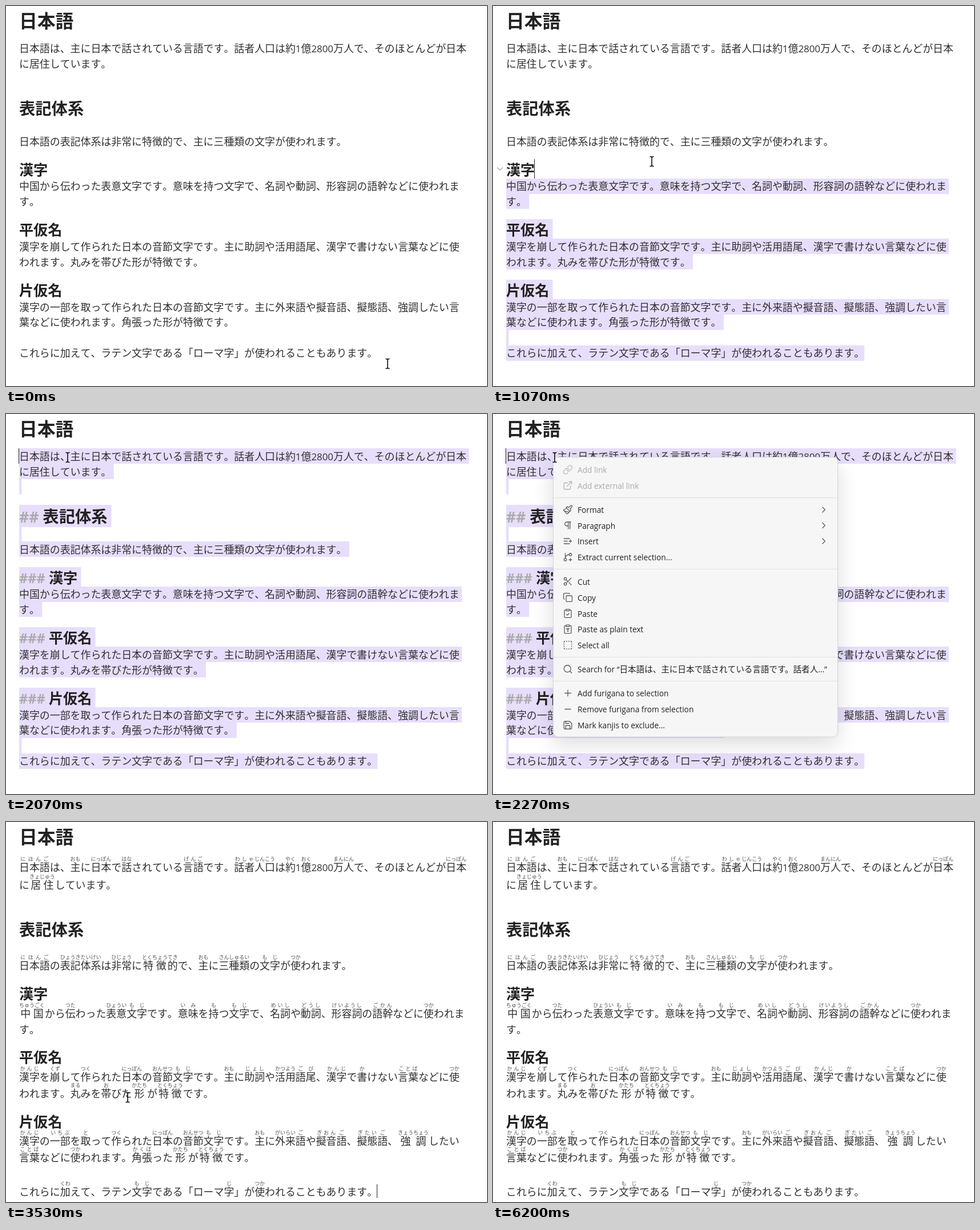
These frames come from a looping animation (842 by 665 pixels, 6800 ms). An HTML page with a canvas:

```html
<!DOCTYPE html>
<html lang="ja">
<head>
<meta charset="utf-8">
<title>日本語</title>
<style>
html, body { margin: 0; width: 100%; height: 100%; overflow: hidden; background: #fff; }
canvas { display: block; }
</style>
</head>
<body>
<canvas id="stage" width="842" height="665"></canvas>
<script>
const ctx = document.getElementById('stage').getContext('2d');
const JP = '"Noto Sans CJK JP", "Noto Sans CJK", sans-serif';
const LATIN = '"Open Sans", "Noto Sans", sans-serif';
const LEFT = 23, RIGHT = 810, BODY = 17.92, H1 = 31.8, H2 = 28.3, H3 = 25.1;
const INK = '#222', BODY_INK = '#303030', RUBY_INK = '#505050', FAINT = '#ababab', SELECTION = '#e7defc';
const TICK = 1000 / 15, TICKS = 102;
const MENU_OPEN = 34, RUBY_ON = 53;

// Each block: size, text with {readings}, line centres without and with readings.
const doc = [
  [H1, '日本語', [26], [26]],
  [BODY, '日本語{にほんご}は、主{おも}に日本{にっぽん}で話{はな}されている言語{げんご}です。話者{わしゃ}人口{じんこう}は約{やく}1億{おく}2800万人{まんにん}で、そのほとんどが日本{にっぽん}に居住{きょじゅう}しています。', [74, 101], [79.5, 110]],
  [BODY, '', [127.5], [0]],
  [H2, '表記体系', [179], [188]],
  [BODY, '', [210.5], [0]],
  [BODY, '日本語{にほんご}の表記体系{ひょうきたいけい}は非常{ひじょう}に特徴{とくちょう}的{てき}で、主{おも}に三種類{さんしゅるい}の文字{もじ}が使{つか}われます。', [237], [251]],
  [H3, '漢字', [286], [300]],
  [BODY, '中国{ちゅうごく}から伝{つた}わった表意{ひょうい}文字{もじ}です。意味{いみ}を持{も}つ文字{もじ}で、名詞{めいし}や動詞{どうし}、形容詞{けいようし}の語幹{ごかん}などに使{つか}われます。', [315.5, 342], [335.5, 363]],
  [H3, '平仮名', [391.5], [411]],
  [BODY, '漢字{かんじ}を崩{くず}して作{つく}られた日本{にっぽん}の音節{おんせつ}文字{もじ}です。主{おも}に助詞{じょし}や活用{かつよう}語尾{ごび}、漢字{かんじ}で書{か}けない言葉{ことば}などに使{つか}われます。丸{まる}みを帯{お}びた形{かたち}が特徴{とくちょう}です。', [421, 448], [446.5, 475]],
  [H3, '片仮名', [497], [524]],
  [BODY, '漢字{かんじ}の一部{いちぶ}を取{と}って作{つく}られた日本{にっぽん}の音節{おんせつ}文字{もじ}です。主{おも}に外来{がいらい}語{ご}や擬音{ぎおん}語{ご}、擬態{ぎたい}語{ご}、強調{きょうちょう}したい言葉{ことば}などに使{つか}われます。角張{かくば}った形{かたち}が特徴{とくちょう}です。', [527, 553.5], [558.5, 587.5]],
  [BODY, '', [580.5], [0]],
  [BODY, 'これらに加{くわ}えて、ラテン文字{もじ}である「ローマ字{じ}」が使{つか}われることもあります。', [607.5], [647]]
];

const clip = 'M9 2h6a1 1 0 0 1 1 1v2a1 1 0 0 1-1 1H9a1 1 0 0 1-1-1V3a1 1 0 0 1 1-1zM16 4h2a2 2 0 0 1 2 2v14a2 2 0 0 1-2 2H6a2 2 0 0 1-2-2V6a2 2 0 0 1 2-2h2';
const ring = (x, y, r) => `M${x} ${y - r}a${r} ${r} 0 1 0 .01 0z`;
// Menu items: centre, label, icon, kind.
const items = [
  [98, 'Add link', 'M10 13a5 5 0 0 0 7.54.54l3-3a5 5 0 0 0-7.07-7.07l-1.72 1.71M14 11a5 5 0 0 0-7.54-.54l-3 3a5 5 0 0 0 7.07 7.07l1.71-1.71', 'off'],
  [125.5, 'Add external link', 'M15 3h6v6M10 14 21 3M18 13v6a2 2 0 0 1-2 2H5a2 2 0 0 1-2-2V8a2 2 0 0 1 2-2h6', 'off'],
  [168, 'Format', 'M14.6 17.9 3.9 15M18.4 2.6a1 1 0 1 1 3 3l-4 4a.5.5 0 0 0 0 .7l.9 1a2.4 2.4 0 0 1 0 3.4l-.9.9a.5.5 0 0 1-.7 0L8.4 7.3a.5.5 0 0 1 0-.7l.9-.9a2.4 2.4 0 0 1 3.4 0l1 .9a.5.5 0 0 0 .7 0zM9 8c-1.8 2.7-4 3.5-6.6 3.9a.5.5 0 0 0-.3.9l7.3 8.8a1 1 0 0 0 1.2.2C12.7 20.4 16 16.8 16 15', 'sub'],
  [195.5, 'Paragraph', 'M13 4v16M17 4v16M19 4H9.5a4.5 4.5 0 0 0 0 9H13', 'sub'],
  [223, 'Insert', 'M11 12H3M16 6H3M16 18H3M18 9v6M21 12h-6', 'sub'],
  [251, 'Extract current selection...', 'M6 3v12' + ring(18, 6, 3) + ring(6, 18, 3) + 'M15 6a9 9 0 0 0-9 9M18 15v6M21 18h-6'],
  [293.5, 'Cut', ring(6, 6, 3) + ring(6, 18, 3) + 'M20 4 8.1 15.9M14.5 14.5 20 20M8.1 8.1 12 12'],
  [321.5, 'Copy', 'M10 8h10a2 2 0 0 1 2 2v10a2 2 0 0 1-2 2H10a2 2 0 0 1-2-2V10a2 2 0 0 1 2-2zM4 16c-1.1 0-2-.9-2-2V4c0-1.1.9-2 2-2h10c1.1 0 2 .9 2 2'],
  [349.5, 'Paste', clip + 'M9 14l2 2 4-4'],
  [377, 'Paste as plain text', clip + 'M9 12v-1h6v1M11 17h2M12 11v6'],
  [405, 'Select all', 'M5 3a2 2 0 0 0-2 2M19 3a2 2 0 0 1 2 2M21 19a2 2 0 0 1-2 2M5 21a2 2 0 0 1-2-2M9 3h1M9 21h1M14 3h1M14 21h1M3 9v1M21 9v1M3 14v1M21 14v1'],
  [447, 'Search for “日本語は、主に日本で話されている言語です。話者人...”', ring(11, 11, 8) + 'M21 21l-4.3-4.3'],
  [489, 'Add furigana to selection', 'M5 12h14M12 5v14'],
  [517, 'Remove furigana from selection', 'M5 12h14'],
  [545, 'Mark kanjis to exclude...', 'M19 21H5a2 2 0 0 1-2-2V5a2 2 0 0 1 2-2h11l5 5v11a2 2 0 0 1-2 2zM17 21v-8H7v8M7 3v5h8']
];

// Pointer path: tick, x, y.
const path = [
  [0, 668, 626], [4, 620, 622], [9, 620, 622], [12, 503, 501], [19, 110, 100],
  [22, 8, 68], [25, 8, 68], [31, 108, 76], [36, 108, 76], [47, 212, 483],
  [48, 209, 480], [52, 209, 480], [53, 213, 482], [57, 213, 482], [63, 300, 690]
];

function pointerAt(tick) {
  const i = path.findIndex(p => p[0] > tick);
  if (i < 0) return path[path.length - 1].slice(1);
  const [t0, x0, y0] = path[i - 1], [t1, x1, y1] = path[i];
  const k = (tick - t0) / (t1 - t0);
  return [x0 + (x1 - x0) * k, y0 + (y1 - y0) * k];
}

const isLatin = c => /[ -~“”]/.test(c);

function setFont(size, latin) {
  const weight = size > 20 ? 700 : latin ? 400 : 350;
  ctx.font = `${weight} ${latin ? size * 0.942 : size}px ${latin ? LATIN : JP}`;
}

// Draws mixed text from x and returns its end; without y it only measures.
function write(text, x, y, size) {
  for (const run of text.match(/[ -~“”]+|[^ -~“”]+/g) || []) {
    setFont(size, isLatin(run[0]));
    if (y !== undefined) ctx.fillText(run, x, Math.round(y + size * 0.38));
    x += ctx.measureText(run).width;
  }
  return x;
}

// Spaces characters evenly over a width, half a gap at each end.
function spread(text, x, width, y, size) {
  const step = width / text.length;
  [...text].forEach((c, i) => write(c, x + i * step + (step - size) / 2, y, size));
}

function layout(text, size) {
  const lines = [{ cells: [], end: LEFT }];
  for (const [all, base, ruby] of text.matchAll(/([一-龠]+)\{([^}]*)\}|[^]/g)) {
    const width = ruby ? Math.max(base.length, ruby.length / 2) * size
      : isLatin(all) ? write(all, 0, undefined, size) : size;
    let line = lines[lines.length - 1];
    if (line.end + width > RIGHT) lines.push(line = { cells: [], end: LEFT });
    line.cells.push({ text: base || all, ruby, x: line.end, width });
    line.end += width;
  }
  return lines;
}

function makeRows(withRuby) {
  return doc.flatMap(([size, text, plainY, rubyY]) => {
    const lines = layout(withRuby ? text : text.replace(/\{.*?\}/g, ''), size);
    return lines.map((line, i) => {
      const y = (withRuby ? rubyY : plainY)[i];
      const heading = size > 20;
      const height = heading ? size * 1.365 : 26.8;
      const top = Math.round(y - height / 2 - (heading ? 1 : 0.3));
      return { ...line, size, y, heading, top, bottom: Math.round(top + height) };
    });
  });
}
const plainRows = makeRows(false), rubyRows = makeRows(true);
const hashes = row => row.size === H2 ? '## ' : row.size === H3 ? '### ' : '';

function drawRow(row, marked) {
  let shift = 0;
  if (marked) {
    ctx.fillStyle = FAINT;
    shift = write(hashes(row), LEFT, row.y, row.size) - LEFT;
  }
  for (const { text, ruby, x, width } of row.cells) {
    ctx.fillStyle = row.heading ? INK : BODY_INK;
    if (!ruby) {
      write(text, x + shift, row.y, row.size);
      continue;
    }
    spread(text, x, width, row.y, row.size);
    ctx.fillStyle = RUBY_INK;
    spread(ruby, x, width, row.y - 14.6, row.size / 2);
  }
}

// Moving end of the selection under the pointer.
function selectionHead([x, y]) {
  let index = plainRows.findIndex((r, i) => i && r.bottom > y);
  const below = index < 0;
  if (below) index = plainRows.length - 1;
  const row = plainRows[index];
  const column = Math.max(0, Math.round((x - LEFT) / row.size));
  return { index, x: below ? row.end : Math.min(row.end, LEFT + column * row.size) };
}

function drawSelection(head, marked) {
  ctx.fillStyle = SELECTION;
  plainRows.forEach((row, i) => {
    if (i < head.index) return;
    const from = i === head.index ? head.x : LEFT;
    if (from >= row.end && row.cells.length) return;
    const shift = marked ? write(hashes(row), 0, undefined, row.size) : 0;
    const newline = i < plainRows.length - 1 ? row.size / 4 : 0;
    ctx.fillRect(from, row.top, row.end + shift + newline - from, row.bottom - row.top);
  });
}

function drawCaret(x, top, bottom) {
  ctx.fillStyle = INK;
  ctx.fillRect(Math.round(x) - 1, top, 1, bottom - top);
}

function icon(d, x, y, color) {
  ctx.save();
  ctx.translate(x, y);
  ctx.scale(0.747, 0.747);
  ctx.translate(-12, -12);
  ctx.strokeStyle = color;
  ctx.lineWidth = 1.75;
  ctx.lineCap = ctx.lineJoin = 'round';
  ctx.stroke(new Path2D(d));
  ctx.restore();
}

function roundBox(x, y, w, h, r, fill) {
  ctx.beginPath();
  ctx.roundRect(x, y, w, h, r);
  ctx.fillStyle = fill;
  ctx.fill();
}

function drawMenu(hoverY) {
  ctx.save();
  ctx.shadowColor = 'rgba(0,0,0,.14)';
  ctx.shadowBlur = 36;
  ctx.shadowOffsetY = 13;
  roundBox(105.5, 75.5, 498, 489.5, 8, '#f6f6f6');
  ctx.restore();
  ctx.strokeStyle = '#d4d4d4';
  ctx.lineWidth = 1;
  ctx.stroke();
  ctx.fillStyle = '#e0e0e0';
  for (const y of [146, 271, 425, 467]) ctx.fillRect(106, y, 497, 1);
  for (const [y, label, d, kind] of items) {
    const off = kind === 'off';
    if (!off && Math.abs(hoverY - y) < 13.9) roundBox(113, y - 14, 484, 27.5, 4, '#e6e6e6');
    icon(d, 131, y - 0.5, off ? '#b4b4b4' : '#5c5c5c');
    ctx.fillStyle = off ? FAINT : INK;
    write(label, 148, y - 0.5, 14.56);
    if (kind === 'sub') icon('m9 18 6-6-6-6', 579, y - 0.5, '#5c5c5c');
  }
}

function drawPointer(x, y, arrow) {
  ctx.save();
  ctx.translate(Math.round(x), Math.round(y));
  ctx.strokeStyle = '#000';
  if (arrow) {
    const shape = new Path2D('M.5.5V17.5L4.5 13.7 7.3 20.3 10 19.1 7.2 12.6H12.6Z');
    ctx.fillStyle = '#fff';
    ctx.fill(shape);
    ctx.lineWidth = 1;
    ctx.stroke(shape);
  } else {
    ctx.lineWidth = 1.5;
    ctx.stroke(new Path2D('M-3.5-8.5Q0-8.5 0-7V7Q0 8.5-3.5 8.5M3.5-8.5Q0-8.5 0-7M0 7Q0 8.5 3.5 8.5'));
  }
  ctx.restore();
}

function draw(tick) {
  const [x, y] = pointerAt(tick);
  const withRuby = tick >= RUBY_ON;
  const menu = tick >= MENU_OPEN && !withRuby;
  const marked = tick >= 26 && !withRuby;
  const rows = withRuby ? rubyRows : plainRows;

  ctx.fillStyle = '#fff';
  ctx.fillRect(0, 0, 842, 665);

  const selecting = tick >= 9 && !withRuby;
  const head = selecting && selectionHead(pointerAt(Math.min(tick, 22)));
  if (selecting) drawSelection(head, marked);
  for (const row of rows) {
    drawRow(row, marked);
    if (row.heading && !menu && y > row.top && y < row.bottom) {
      icon('m6 9 6 6 6-6', 12, row.y - 1, FAINT);
    }
  }

  if (selecting && (tick < 22 || tick >= 26 && tick < 35 || tick >= 43)) {
    const row = plainRows[head.index];
    drawCaret(head.x, row.top, row.bottom);
  }
  if (withRuby && Math.floor((tick - RUBY_ON) / 8) % 2 === 0) drawCaret(650, 634, 658);

  const overMenu = menu && tick > 36;
  if (menu) drawMenu(overMenu ? y + 2 : 0);
  drawPointer(x, y, overMenu || x < 22);
}

const start = performance.now();
function loop() {
  const time = performance.now() - start;
  draw(Math.floor((time + 5) / TICK) % TICKS);
  requestAnimationFrame(loop);
}
loop();
</script>
</body>
</html>
```
